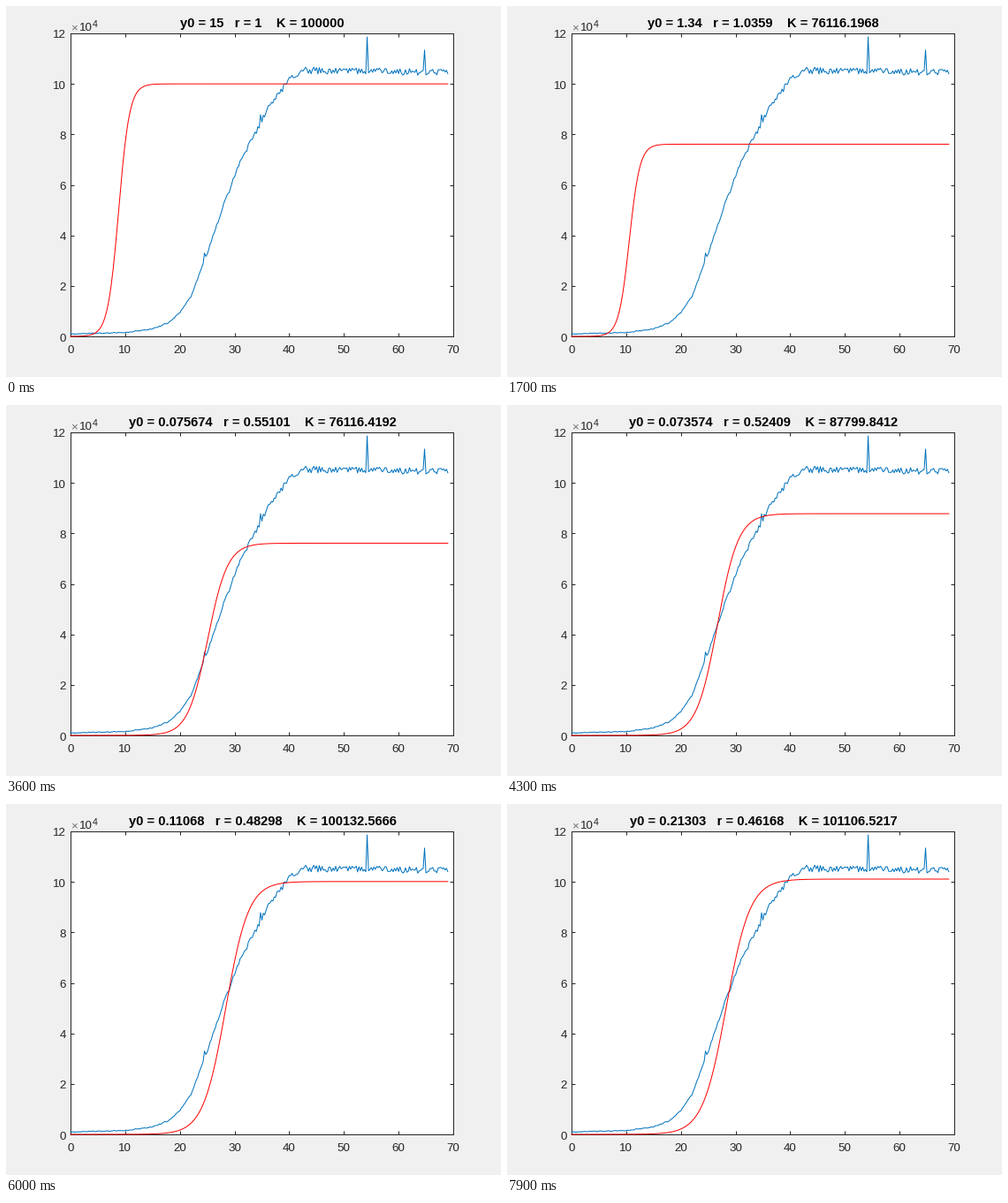
Animation, 560 px wide and 420 px high, one loop 8000 ms. Source, as a matplotlib script:

```python
import math

import matplotlib.pyplot as plt
import numpy as np
from matplotlib.animation import FuncAnimation

W, H = 560, 420
PX = 0.72  # points per pixel at 100 dpi
LEFT, RIGHT, TOP, BOTTOM = 73, 506, 31, 374
GREY = "#262626"
EPS = 1.49e-8  # relative step of the finite difference

plt.rcParams["font.family"] = "Liberation Sans"


def measured():
    """Noisy growth curve with a few outliers."""
    x = np.arange(0, 69.1, 0.25)
    knots_x = [0, 10, 15, 18, 20, 22, 25, 28, 31, 36, 40, 43, 69]
    knots_y = [0.9, 1.5, 2.9, 5.5, 9.5, 15.8, 33, 52, 69, 89.6, 101.8, 105.3, 104.5]
    y = np.interp(x, knots_x, knots_y) * 1000
    noise = np.random.default_rng(4).uniform(-1, 1, x.size)
    y += noise * (180 + 0.011 * y)
    for t, value in [(24.5, 33000), (34.75, 87800), (54.25, 118600), (64.75, 113400)]:
        y[round(t * 4)] = value
    return x, y


# Fitting history: accepted (y0, r, K) at key iterations, blended in between.
ACCEPTED = {
    0: (15, 1, 100000),
    1: (71.3846, 0.27162, 76114.3021),
    2: (0.074967, 0.49972, 76116.1876),
    4: (0.075674, 0.55101, 76116.4181),
    6: (0.071532, 0.49718, 99483.2617),
    11: (0.21303, 0.46168, 101106.5202),
}
REJECTED = [1, 0, 15, 1, 3, 4, 1, 0, 3, 4, 0, 0]  # trials per iteration
# Large overshoots: trial index where the point is reached, stiffness, point.
OVERSHOOT = {
    2: (10, 3.6, (0.34997, 0.61628, 76116.1896)),
    5: (3, 0.02, (0.070697, 0.47972, 192931.5793)),
    9: (1, 0.36, (0.84695, 0.24446, 130073.4535)),
}


def accepted(n):
    y0, r, k = zip(*ACCEPTED.values())
    keys = list(ACCEPTED)
    return np.array([np.exp(np.interp(n, keys, np.log(y0))),
                     np.interp(n, keys, r), np.interp(n, keys, k)])


def trial(n, j):
    """Trial j of iteration n; damping grows tenfold with each rejection."""
    base = accepted(n)
    at, stiff, point = OVERSHOOT.get(n, (0, 0.36, base * (4, 1.1, 1.0002)))
    reach = (1 + stiff) / (1 + stiff * 10.0 ** (j - at))
    return base + (np.array(point) - base) * reach


def timeline():
    states = []
    for n, count in enumerate(REJECTED):
        base = accepted(n)
        states += [base] * 3 + [base * (1, 1, 1 + EPS)]
        states += [trial(n, j) for j in range(count)]
    return states


def logistic(t, y0, r, k):
    return k / (1 + (k / y0 - 1) * np.exp(-r * t))


def number(v):
    digits = max(5, math.floor(math.log10(abs(v))) + 5)
    return f"{v:.{digits}g}"


fig = plt.figure(figsize=(W / 100, H / 100), dpi=100, facecolor="#f0f0f0")
ax = fig.add_axes([LEFT / W, 1 - BOTTOM / H, (RIGHT - LEFT) / W, (BOTTOM - TOP) / H])
ax.set_xlim(0, 70)
ax.set_axisbelow(True)
ax.tick_params(direction="in", top=True, right=True, length=4.3 * PX,
               width=PX, color=GREY, labelbottom=False, labelleft=False)
for spine in ax.spines.values():
    spine.set(color=GREY, linewidth=PX, zorder=0.6)


def label(x, y, text, size=13.33, color=GREY, **style):
    return fig.text(x / W, 1 - y / H, text, fontsize=size * PX, color=color,
                    va="baseline", **style)


title = label(290, 24, "", 14.67, "black", ha="center", weight="bold")
label(73.5, 28.5, "×", color="#707070")
label(82.5, 28.5, "10")
exponent = label(97.5, 24, "", 10.67)
for v in range(0, 71, 10):
    label(LEFT + (RIGHT - LEFT) * v / 70, 393, str(v), ha="center")
y_labels = [label(68, 0, "", ha="right") for _ in range(11)]

DATA_X, DATA_Y = measured()
FIT_X = np.linspace(0, 69, 400)
STATES = timeline()
ax.plot(DATA_X, DATA_Y, color="#0072bd", linewidth=PX, clip_on=False)
fit, = ax.plot([], [], color="red", linewidth=PX, clip_on=False)


def draw(i):
    y0, r, k = STATES[i]
    curve = logistic(FIT_X, y0, r, k)
    fit.set_data(FIT_X, curve)
    title.set_text(f"y0 = {number(y0)}   r = {number(r)}    K = {number(k)}")

    top = math.ceil(max(DATA_Y.max(), curve.max()) / 2e4) * 20000
    power = 5 if top >= 2e5 else 4
    ax.set_ylim(0, top)
    ax.set_yticks(np.arange(0, top + 1, 20000))
    exponent.set_text(str(power))
    for n, text in enumerate(y_labels):
        v = n * 20000
        text.set_text(f"{v / 10 ** power:g}" if v <= top else "")
        text.set_y(1 - (BOTTOM + 5.5 - (BOTTOM - TOP) * v / top) / H)
    return fit, title, exponent, *y_labels


anim = FuncAnimation(fig, draw, frames=len(STATES), interval=100,
                     init_func=lambda: draw(0), repeat=True, repeat_delay=0)
plt.show()
```
